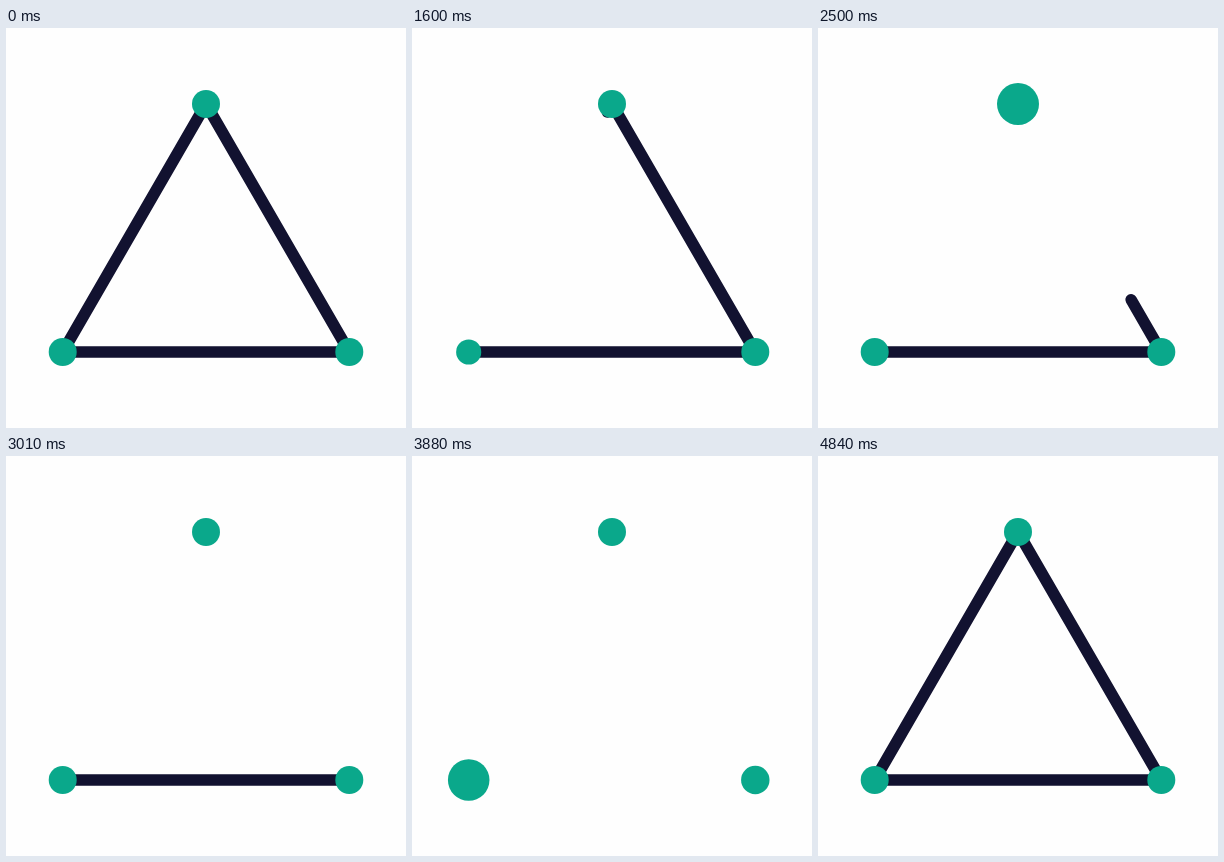
Write an HTML page with a canvas that moves like this. It is 400 by 400 pixels and loops after 4930 ms.

```html
<!DOCTYPE html>
<html lang="en">
<head>
<meta charset="utf-8">
<title>Triangle</title>
<style>
html, body { margin: 0; width: 100%; height: 100%; overflow: hidden; background: #fefefe; }
canvas { display: block; width: 400px; height: 400px; }
</style>
</head>
<body>
<canvas id="stage"></canvas>
<script>
const LOOP = 4930, STEP = 30, RADIUS = 14, WIDTH = 11.5;
const L = { x: 56.7, y: 324 }, T = { x: 200, y: 76 }, R = { x: 343.3, y: 324 };
const SIDES = [[L, T], [T, R], [R, L]];

// Each pulse: dot, time it swells, time it shrinks back.
const PULSES = [[L, 1000, 1490], [T, 2005, 2570], [R, 3109, 3649], [L, 3649, 4189]];
// Each side is wiped from its first point towards its second.
const WIPES = [[1120, 1720], [2125, 2725], [3070, 3460]];
const DRAW = [3772, 4852];

const canvas = document.getElementById("stage");
const ctx = canvas.getContext("2d");
const dpr = window.devicePixelRatio || 1;
canvas.width = canvas.height = 400 * dpr;

const clamp = v => Math.min(1, Math.max(0, v));
const progress = (t, [from, to]) => clamp((t - from) / (to - from));
const inOut = u => u < 0.5 ? 4 * u ** 3 : 1 - 4 * (1 - u) ** 3;

function elastic(t, start) {
  const u = (t - start) / 540;
  if (u <= 0) return 0;
  if (u >= 1) return 1;
  return 1 - 2 ** (-10 * u) * Math.cos(u * Math.PI * 4);
}

function radius(dot, t) {
  let swell = 0;
  for (const [p, up, down] of PULSES) {
    if (p === dot) swell += elastic(t, up) - elastic(t, down);
  }
  return RADIUS * (1 + swell / 2);
}

function line([a, b], from, to) {
  if (to - from < 0.001) return;
  const at = u => [a.x + (b.x - a.x) * u, a.y + (b.y - a.y) * u];
  ctx.beginPath();
  ctx.moveTo(...at(from));
  ctx.lineTo(...at(to));
  ctx.stroke();
}

function render(t) {
  ctx.setTransform(dpr, 0, 0, dpr, 0, 0);
  ctx.fillStyle = "#fefefe";
  ctx.fillRect(0, 0, 400, 400);

  ctx.strokeStyle = "#121230";
  ctx.lineWidth = WIDTH;
  ctx.lineCap = "round";
  const drawn = 3 * inOut(progress(t, DRAW));
  SIDES.forEach((side, i) => {
    if (t < DRAW[0]) line(side, inOut(progress(t, WIPES[i])), 1);
    else line(side, 0, clamp(drawn - i));
  });

  ctx.fillStyle = "#0aa88b";
  for (const dot of [L, T, R]) {
    ctx.beginPath();
    ctx.arc(dot.x, dot.y, radius(dot, t), 0, Math.PI * 2);
    ctx.fill();
  }
}

const begin = performance.now();
function tick(now) {
  const t = Math.max(0, now - begin) % LOOP;
  const held = Math.floor((t - 10) / STEP) * STEP + 10;
  // The closed triangle rests at both ends of the loop.
  render(held < 1030 || held > 4840 ? 0 : held);
  requestAnimationFrame(tick);
}
render(0);
requestAnimationFrame(tick);
</script>
</body>
</html>
```
